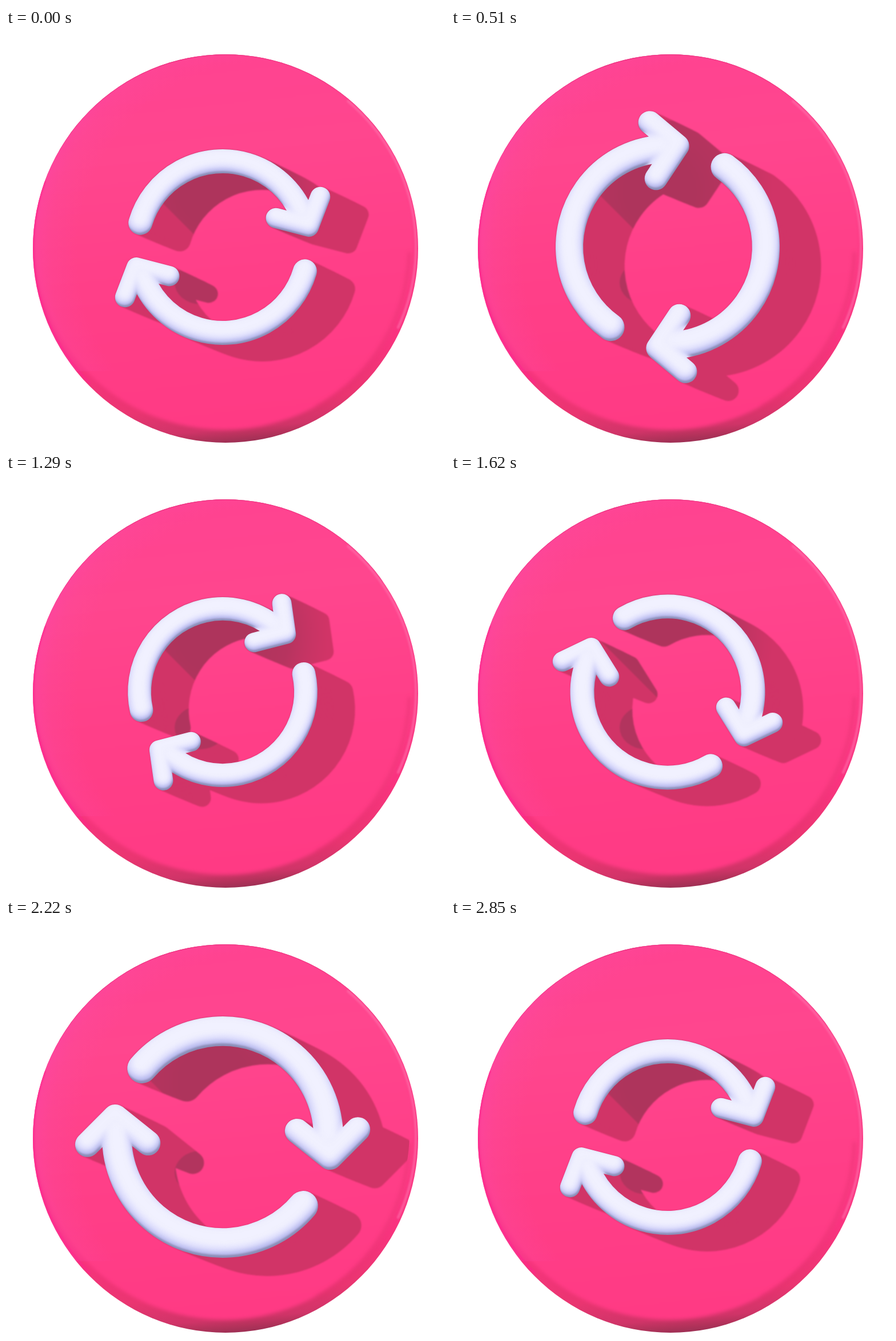
Recreate the animation shown at these times as an HTML page with a canvas. Size 768x729 px, loop 2880 ms.

```html
<!DOCTYPE html>
<html lang="en">
<head>
<meta charset="utf-8">
<title>Refresh</title>
<style>
html, body { margin: 0; width: 100%; height: 100%; overflow: hidden; background: #fff; }
canvas { display: block; }
</style>
</head>
<body>
<canvas id="stage" width="768" height="729"></canvas>
<script>
const W = 768, H = 729, LOOP = 2880, STEP = 30, SPAN = 2850;
const CX = 379, CY = 383;
const RAD = Math.PI / 180;
const ctx = document.getElementById('stage').getContext('2d');

// time, turn in degrees, scale
const KEYS = [
  [0, 16.4, 1],
  [510, 125.4, 1.146],
  [810, 226.6, 1.177],
  [1290, 347.4, 0.97],
  [1620, 419.8, 0.997],
  [2220, 580.4, 1.234]
];

function layer() {
  const c = document.createElement('canvas');
  c.width = W;
  c.height = H;
  return c.getContext('2d');
}

function keyAt(i, col) {
  const n = KEYS.length, lap = Math.floor(i / n), k = KEYS[i - lap * n];
  return [k[0] + lap * SPAN, k[col] + (col === 1 ? lap * 720 : 0)];
}

function slopeAt(i, col) {
  const a = keyAt(i - 1, col), b = keyAt(i, col), c = keyAt(i + 1, col);
  const h0 = b[0] - a[0], h1 = c[0] - b[0];
  return ((b[1] - a[1]) / h0 * h1 + (c[1] - b[1]) / h1 * h0) / (h0 + h1);
}

// Smooth periodic curve through the keys
function valueAt(t, col) {
  let i = 0;
  while (i < KEYS.length - 1 && t >= KEYS[i + 1][0]) i++;
  const a = keyAt(i, col), b = keyAt(i + 1, col), h = b[0] - a[0];
  const u = (t - a[0]) / h, v = 1 - u;
  return a[1] * (1 + 2 * u) * v * v + b[1] * u * u * (3 - 2 * u)
    + h * (slopeAt(i, col) * u * v * v - slopeAt(i + 1, col) * u * u * v);
}

function polar(r, deg) {
  return [r * Math.cos(deg * RAD), r * Math.sin(deg * RAD)];
}

function buildArrows() {
  const arcs = new Path2D(), heads = new Path2D();
  for (const turn of [0, 180]) {
    const start = polar(150, turn);
    arcs.moveTo(...start);
    arcs.arc(0, 0, 150, turn * RAD, (turn + 141) * RAD);
    heads.moveTo(...polar(106, turn + 135));
    heads.lineTo(...polar(155, turn + 150.3));
    heads.lineTo(...polar(192, turn + 136.4));
  }
  return { arcs, heads };
}
const arrows = buildArrows();

function drawArrows(g, pose, dx, dy, color, thick) {
  g.save();
  g.translate(CX + dx, CY + dy);
  g.rotate(pose.turn * RAD);
  g.scale(pose.scale, pose.scale);
  g.strokeStyle = color;
  g.lineCap = g.lineJoin = 'round';
  g.lineWidth = 42 * thick;
  g.stroke(arrows.arcs);
  g.lineWidth = 35 * thick;
  g.stroke(arrows.heads);
  g.restore();
}

function ellipse(g, x, y, rx, ry, from = 0, to = 360) {
  g.beginPath();
  g.ellipse(x, y, rx, ry, 0, from * RAD, to * RAD);
}

function gradient(g, box, stops) {
  const fill = box.length === 4 ? g.createLinearGradient(...box) : g.createRadialGradient(...box);
  stops.forEach(([p, c]) => fill.addColorStop(p, c));
  return fill;
}

function rimLine(g, r, from, to, width, color, blur) {
  g.filter = `blur(${blur}px)`;
  g.strokeStyle = color;
  g.lineWidth = width;
  g.lineCap = 'round';
  ellipse(g, 384, 383, r, r, from, to);
  g.stroke();
  g.filter = 'none';
}

function paintDisk() {
  const g = layer();
  ellipse(g, 384, 385.5, 337, 339.5);
  g.clip();
  g.fillStyle = gradient(g, [370, 560, 384, 725], [
    [0, '#fa3480'], [0.6, '#ea3571'], [0.86, '#d03468'], [0.94, '#b4325b'], [1, '#a03055']
  ]);
  g.fillRect(0, 0, W, H);

  g.filter = 'blur(3px)';
  g.fillStyle = gradient(g, [330, 46, 400, 705], [
    [0, '#ff4391'], [0.25, '#ff468e'], [0.6, '#ff3f88'], [1, '#ff3a84']
  ]);
  ellipse(g, 382, 372, 333, 330);
  g.fill();
  g.filter = 'none';

  // Magenta light on the left edge
  g.fillStyle = gradient(g, [460, 395, 335, 460, 395, 415], [
    [0, 'rgba(250,75,165,0)'], [0.6, 'rgba(250,75,165,.22)'], [1, 'rgba(250,70,175,.45)']
  ]);
  g.fillRect(0, 0, W, 600);

  rimLine(g, 322, 2, 60, 5, 'rgba(222,48,108,.45)', 3);
  rimLine(g, 333, -50, 25, 4, 'rgba(255,110,170,.7)', 1.5);
  rimLine(g, 337, -150, -35, 2, 'rgba(225,45,120,.7)', 0.7);
  rimLine(g, 336, 135, 200, 3, 'rgba(255,35,140,.7)', 1);
  return g.canvas;
}

const disk = paintDisk();
const shade = layer(), tube = layer();

// Deeper tone where the fill light is blocked too
function deepenShadow(g) {
  g.save();
  g.globalCompositeOperation = 'source-atop';
  g.fillStyle = '#b2345e';
  ellipse(g, 340, 445, 45, 38);
  g.fill();
  g.beginPath();
  g.moveTo(130, 162);
  g.lineTo(400, 432);
  g.lineTo(W, 432);
  g.lineTo(W, 162);
  g.clip();
  g.fillStyle = gradient(g, [365, 285, 60, 365, 285, 200], [
    [0, 'rgba(174,52,92,1)'], [0.5, 'rgba(178,52,94,.85)'], [1, 'rgba(190,52,98,0)']
  ]);
  g.fillRect(0, 0, W, H);
  g.restore();
}

function paintShadow(pose) {
  const g = shade, grow = pose.scale - 1;
  const dx = 69 + grow * 40, dy = 31 + grow * 15;
  g.clearRect(0, 0, W, H);
  for (let k = 0; k <= 1; k += 1 / 32) {
    drawArrows(g, pose, dx * k, dy * k, '#d13467', 1 - 0.1 * k * k);
  }
  deepenShadow(g);

  ctx.save();
  ellipse(ctx, 382, 373, 324, 324);
  ctx.clip();
  ctx.filter = 'blur(0.8px)';
  ctx.drawImage(g.canvas, 0, 0);
  ctx.restore();
}

function paintTubes(pose) {
  const g = tube, s = pose.scale;
  g.globalCompositeOperation = 'source-over';
  g.clearRect(0, 0, W, H);
  drawArrows(g, pose, 0, 0, '#8c8eb8', 1);
  g.globalCompositeOperation = 'source-atop';
  const coats = [
    [-1, -4, '#b8baee', 1, 1.5],
    [-2, -8, '#dcdcfd', 0.97, 3],
    [-1, -8, '#f1f1ff', 0.65, 4]
  ];
  for (const [dx, dy, color, thick, blur] of coats) {
    g.filter = `blur(${blur * s}px)`;
    drawArrows(g, pose, dx * s, dy * s, color, thick);
  }
  g.filter = 'none';
  ctx.drawImage(g.canvas, 0, 0);
}

function draw(now) {
  const t = Math.floor((now % LOOP) / STEP) * STEP;
  const pose = { turn: valueAt(t, 1) + 180, scale: valueAt(t, 2) };
  ctx.fillStyle = '#fff';
  ctx.fillRect(0, 0, W, H);
  ctx.drawImage(disk, 0, 0);
  paintShadow(pose);
  paintTubes(pose);
}

const begin = performance.now();
function tick() {
  draw(performance.now() - begin);
  requestAnimationFrame(tick);
}
tick();
</script>
</body>
</html>
```
